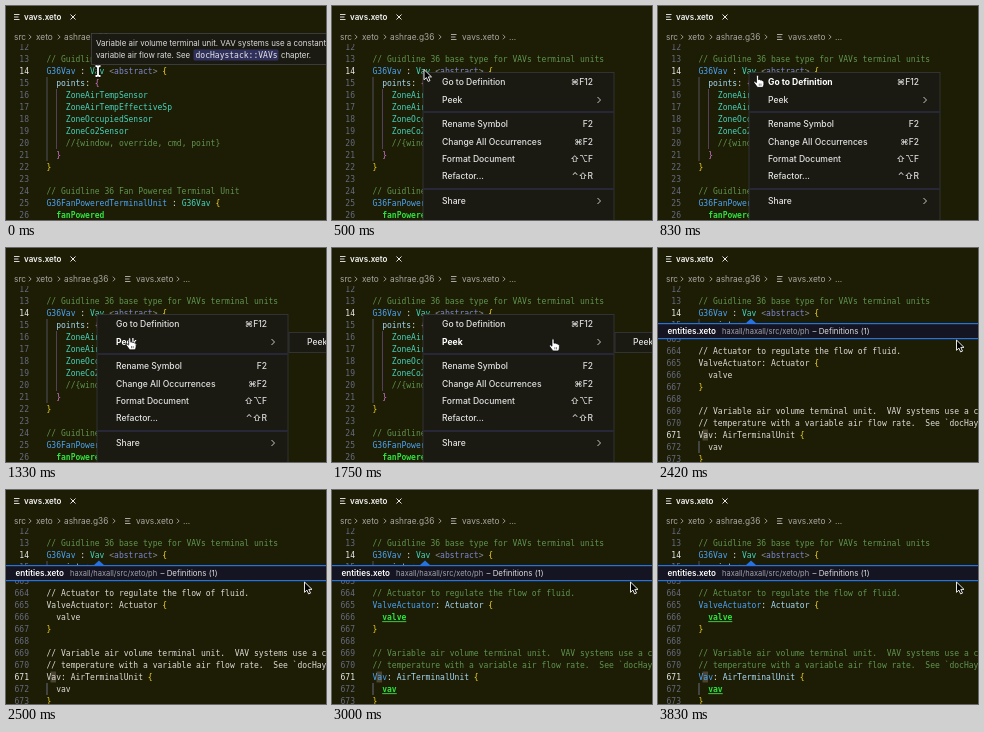
Animation of 320 by 214 pixels, one loop 3910 ms. Source, as an HTML page:

```html
<!DOCTYPE html>
<html lang="en">
<head>
<meta charset="utf-8">
<title>Editor peek</title>
<style>
  html, body { margin: 0; width: 100%; height: 100%; overflow: hidden; background: #1d1c04; }
  svg { display: block; width: 100vw; height: 100vh; }
  text { white-space: pre; }
  .ui { font-family: Inter, "Noto Sans", "DejaVu Sans", sans-serif; }
  .code { font-family: "DejaVu Sans Mono", "Liberation Mono", monospace; font-size: 8.02px; }
</style>
</head>
<body>
<svg id="stage" viewBox="0 0 320 214" preserveAspectRatio="none"></svg>
<script>
const NS = 'http://www.w3.org/2000/svg';
const stage = document.getElementById('stage');
const LOOP = 3910, STEP = 1000 / 12;
const MENU_AT = 250, SUB_AT = 1240, PEEK_AT = 2410, LIT_AT = 2740;

const BG = '#1d1c04', PANEL = '#1a1a12', BLUE = '#2672e0';
const C = {
  plain: '#dcdcd8', comment: '#5f9450', type: '#4ba4f6', item: '#46d3bd',
  prop: '#a4d8f4', angle: '#8a8a96', meta: '#7c86d4', gold: '#f4d828',
  pink: '#d27ad2', green: '#30e040', num: '#666a80', numOn: '#e8e8e8'
};
const FLAT = { ...C, comment: C.plain, type: C.plain, prop: C.plain, green: C.plain };

function el(parent, tag, attrs, content) {
  const node = document.createElementNS(NS, tag);
  for (const key in attrs) node.setAttribute(key, attrs[key]);
  if (content !== undefined) node.textContent = content;
  parent.appendChild(node);
  return node;
}
const group = parent => el(parent, 'g', {});
const rect = (p, x, y, width, height, fill, more) =>
  el(p, 'rect', { x, y, width, height, fill, ...more });
const path = (p, d, more) => el(p, 'path', { d, fill: 'none', ...more });
const ui = (p, x, y, size, fill, str, more) =>
  el(p, 'text', { class: 'ui', x, y: y + size * 0.36, 'font-size': size, fill, ...more }, str);

// One code line: number, indent column, then pairs of text and colour name.
function code(p, y, num, col, tokens, active, colors = C) {
  el(p, 'text', {
    class: 'code', x: 23, y: y + 3, 'text-anchor': 'end',
    fill: active ? C.numOn : C.num
  }, num);
  const line = el(p, 'text', { class: 'code', x: 40.5 + col * 4.83, y: y + 3 });
  for (let i = 0; i < tokens.length; i += 2) {
    const name = tokens[i + 1];
    const weight = colors[name] === C.green ? 700 : 400;
    el(line, 'tspan', { fill: colors[name], 'font-weight': weight }, tokens[i]);
  }
}

function fileIcon(p, x, y, color) {
  path(p, `M${x} ${y - 2.5}h5.5M${x} ${y}h4.5M${x} ${y + 2.5}h5.5`, { stroke: color, 'stroke-width': 1 });
}
function chevron(p, x, y, r, color) {
  path(p, `M${x - r / 2} ${y - r}l${r} ${r}l${-r} ${r}`, { stroke: color, 'stroke-width': 0.9 });
}

function drawEditor(p) {
  path(p, 'M41 71v84', { stroke: '#55505c' });
  path(p, 'M50.5 83v60', { stroke: '#54405c' });
  const rows = [
    [0], [0, '// Guidline 36 base type for VAVs terminal units', 'comment'],
    [0, 'G36Vav', 'type', ' : ', 'plain', 'Vav', 'item', ' <', 'angle', 'abstract', 'meta', '>', 'angle', ' {', 'gold'],
    [2, 'points', 'prop', ': ', 'plain', '{', 'pink'],
    [4, 'ZoneAirTempSensor', 'item'],
    [4, 'ZoneAirTempEffectiveSp', 'item'],
    [4, 'ZoneOccupiedSensor', 'item'],
    [4, 'ZoneCo2Sensor', 'item'],
    [4, '//{window, override, cmd, point}', 'comment'],
    [2, '}', 'pink'],
    [0, '}', 'gold'],
    [0],
    [0, '// Guidline 36 Fan Powered Terminal Unit', 'comment'],
    [0, 'G36FanPoweredTerminalUnit', 'type', ' : ', 'plain', 'G36Vav', 'item', ' {', 'gold'],
    [2, 'fanPowered', 'green']
  ];
  rows.forEach(([col, ...tokens], i) => code(p, 41 + i * 12, 12 + i, col, tokens, i === 2));
}

function drawHeader(p) {
  rect(p, 0, 0, 320, 38, BG);
  fileIcon(p, 8, 11, '#d8d8d8');
  ui(p, 18, 11, 8, '#f4f4f4', 'vavs.xeto', { 'font-weight': 600 });
  path(p, 'M64.5 8.5l5 5m0 -5l-5 5', { stroke: '#e4e4e4', 'stroke-width': 1 });
  const crumb = '#a8a8a4';
  [[8, 'src'], [30, 'xeto'], [58, 'ashrae.g36'], [130, 'vavs.xeto'], [177, '...']]
    .forEach(([x, str]) => ui(p, x, 31, 8.3, crumb, str));
  [24, 53, 108, 172].forEach(x => chevron(p, x, 31, 2.3, crumb));
  fileIcon(p, 119, 31, crumb);
}

function drawTip(p) {
  rect(p, 85.5, 27.5, 240, 31, PANEL, { stroke: '#44444a', 'stroke-width': 0.8 });
  const text = '#dedede';
  ui(p, 90, 37.5, 7.93, text, 'Variable air volume terminal unit. VAV systems use a constant');
  ui(p, 90, 49, 7.85, text, 'variable air flow rate. See');
  rect(p, 187.5, 43.5, 85, 11, '#30305c', { rx: 1.5 });
  el(p, 'text', { class: 'code', x: 189.5, y: 52, fill: '#e4e4e4' }, 'docHaystack::VAVs');
  ui(p, 275, 49, 7.85, text, 'chapter.');
}

function drawMenu(p) {
  rect(p, 91, 66.5, 191, 160, PANEL, { stroke: '#38383e', 'stroke-width': 0.8 });
  [106, 183].forEach(y => rect(p, 91.5, y - 0.5, 190, 1, '#34345c'));
  const items = [
    [76, 'Go to Definition', '⌘F12'], [94, 'Peek', '>'],
    [118, 'Rename Symbol', 'F2'], [135.5, 'Change All Occurrences', '⌘F2'],
    [153, 'Format Document', '⇧⌥F'], [170, 'Refactor...', '⌃⇧R'], [195, 'Share', '>']
  ];
  return items.map(([y, label, key]) => {
    if (key === '>') chevron(p, 267, y, 3, '#d8d8d8');
    else ui(p, 261, y, 8.5, '#dcdcdc', key, { 'text-anchor': 'end', 'font-weight': 500 });
    return ui(p, 110, y, 8.55, '#e2e2e2', label, { 'font-weight': 500 });
  });
}

function drawSub(p) {
  rect(p, 283, 84.5, 50, 20, PANEL, { stroke: '#38383e', 'stroke-width': 0.8 });
  return ui(p, 301, 94, 8.55, '#e2e2e2', 'Peek', { 'font-weight': 500 });
}

function drawPeekCode(p, colors) {
  const rows = [
    [0],
    [0, '// Actuator to regulate the flow of fluid.', 'comment'],
    [0, 'ValveActuator', 'type', ': ', 'plain', 'Actuator', 'prop', ' {', 'gold'],
    [2, 'valve', 'green'],
    [0, '}', 'gold'],
    [0],
    [0, '// Variable air volume terminal unit.  VAV systems use a constant', 'comment'],
    [0, '// temperature with a variable air flow rate.  See `docHaystack', 'comment'],
    [0, 'Vav', 'type', ': ', 'plain', 'AirTerminalUnit', 'prop', ' {', 'gold'],
    [2, 'vav', 'green'],
    [0, '}', 'gold']
  ];
  rows.forEach(([col, ...tokens], i) =>
    code(p, 91 + i * 12, 663 + i, col, tokens, i === 8, colors));
}

function drawPeekHeader(p) {
  rect(p, 0, 75, 320, 16, '#141422');
  rect(p, 0, 75, 320, 1.2, BLUE);
  rect(p, 0, 90, 320, 1.2, BLUE);
  path(p, 'M87.5 75.5l5.5 -5l5.5 5z', { fill: BLUE });
  ui(p, 9.5, 83.5, 8.1, '#ffffff', 'entities.xeto', { 'font-weight': 600 });
  ui(p, 64, 83.5, 7.5, '#a4a4ac', 'haxall/haxall/src/xeto/ph');
  ui(p, 154.5, 83.5, 7.9, '#dcdcdc', '– Definitions (1)');
}

const editor = group(stage);
rect(editor, 0, 0, 320, 214, BG);
drawEditor(editor);
drawHeader(editor);

const tip = group(stage), menu = group(stage), sub = group(stage);
drawTip(tip);
const labels = drawMenu(menu);
const subLabel = drawSub(sub);

const peek = group(stage);
rect(peek, 0, 75, 320, 139, BG);
path(peek, 'M41 193v12', { stroke: '#6a6a80' });
rect(peek, 44.5, 181.5, 5.5, 11, '#4a4430');
const flat = group(stage), lit = group(stage), peekHeader = group(stage);
drawPeekCode(flat, FLAT);
drawPeekCode(lit, C);
rect(lit, 50.2, 131.2, 24.1, 0.9, C.green);
rect(lit, 50.2, 203.2, 14.5, 0.9, C.green);
drawPeekHeader(peekHeader);

// Pointer shapes share their hot spot at 0,0.
const beam = group(stage), arrow = group(stage), hand = group(stage);
const beamShape = 'M-2.5 -5q2.5 0 2.5 1.5q0 -1.5 2.5 -1.5M0 -3.5v7M-2.5 5q2.5 0 2.5 -1.5q0 1.5 2.5 1.5';
path(beam, beamShape, { stroke: '#000', 'stroke-width': 3.2 });
path(beam, beamShape, { stroke: '#fff', 'stroke-width': 1.8 });
path(arrow, 'M0.5 0.5v10.3l2.4 -2.2l1.7 3.8l1.9 -0.8l-1.7 -3.7h3.2z',
  { fill: '#000', stroke: '#fff', 'stroke-width': 0.9 });
path(hand, 'M-0.8 0.9q0 -1.2 1 -1.2t1 1.2v3.2q1.6 -0.7 2 0.4q1.4 -0.4 1.8 0.6q1.6 -0.1 1.6 1.4v2.3q0 1.6 -1.2 3h-5.2l-3.4 -4.6q-0.6 -1.4 0.6 -1.5l1.8 1.4z',
  { fill: '#fff', stroke: '#000', 'stroke-width': 0.7 });
path(hand, 'M2 8v2.2M3.7 8v2.2', { stroke: '#000', 'stroke-width': 0.5 });

const show = (node, on) => node.setAttribute('visibility', on ? 'visible' : 'hidden');
const ease = (t, from, to) => {
  const u = Math.min(1, Math.max(0, (t - from) / (to - from)));
  return u * u * (3 - 2 * u);
};
function bold(node, on) {
  node.setAttribute('font-weight', on ? 700 : 500);
  node.setAttribute('fill', on ? '#ffffff' : '#e2e2e2');
}

function render(time) {
  const t = Math.floor((time % LOOP + 4) / STEP) * STEP;
  const tipOn = t < MENU_AT - 1;
  const peekOn = t >= PEEK_AT, litOn = t >= LIT_AT;
  const menuOn = !tipOn && !peekOn;

  const down = ease(t, 660, 1200), across = ease(t, 1400, 2050);
  const x = 91.5 + 32 * down + 174.5 * across;
  const y = 63 + 27 * down + 2 * across;

  show(tip, tipOn);
  show(menu, menuOn);
  show(sub, menuOn && t >= SUB_AT);
  show(peek, peekOn);
  show(peekHeader, peekOn);
  show(flat, peekOn && !litOn);
  show(lit, litOn);
  bold(labels[0], y > 68 && y < 85);
  bold(labels[1], y >= 85);
  bold(subLabel, x > 284);

  const handOn = menuOn && y > 68;
  show(beam, tipOn);
  show(hand, handOn);
  show(arrow, menuOn && !handOn || peekOn);
  beam.setAttribute('transform', 'translate(92 65)');
  arrow.setAttribute('transform', `translate(${x} ${peekOn ? 91.5 : y})`);
  hand.setAttribute('transform', `translate(${x} ${y})`);
}

const start = performance.now();
function tick() {
  render(performance.now() - start);
  requestAnimationFrame(tick);
}
render(0);
requestAnimationFrame(tick);
</script>
</body>
</html>
```
